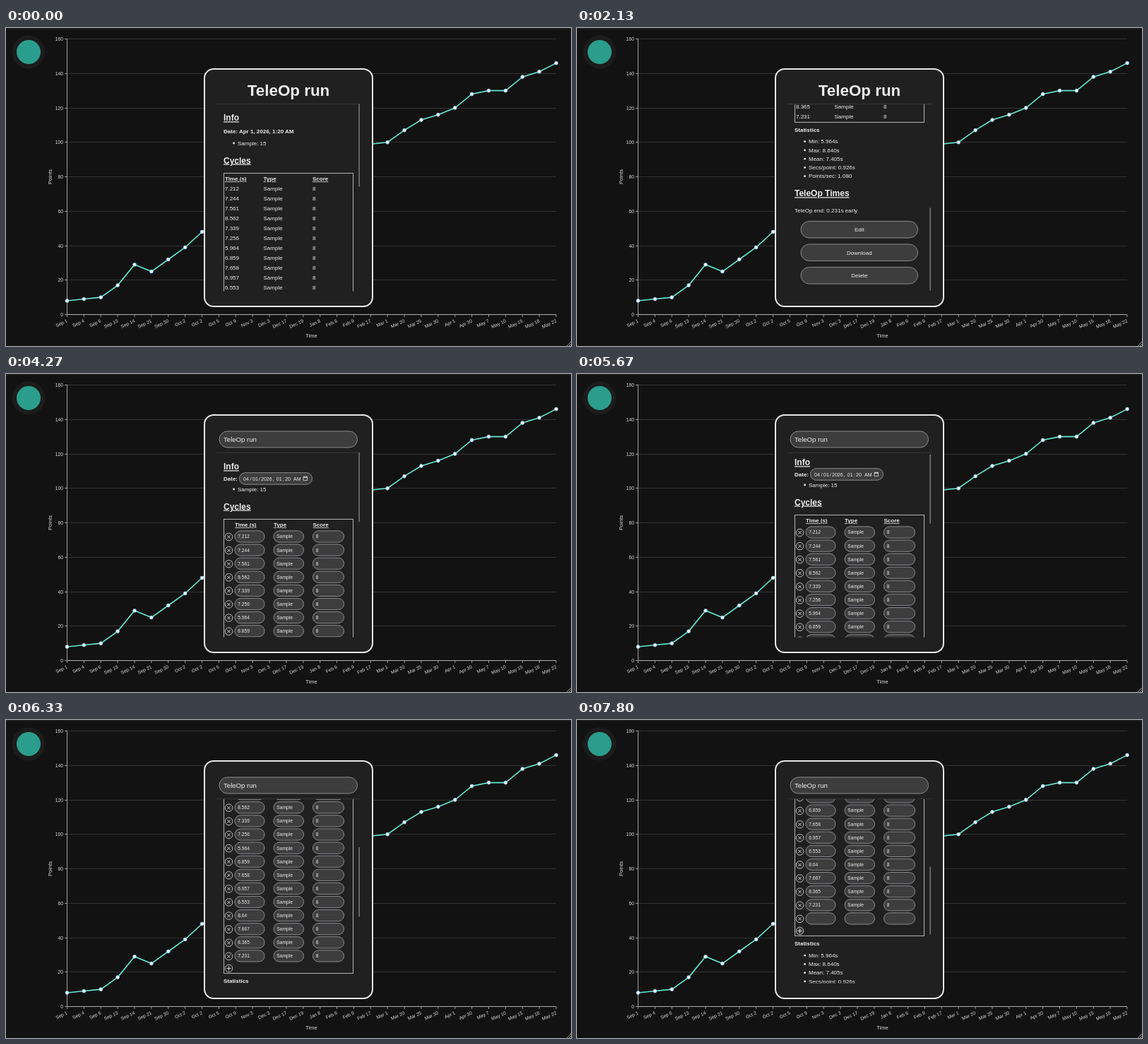
Write an HTML page that moves like this. It is 800 by 450 pixels and loops after 8000 ms.

```html
<!DOCTYPE html>
<html lang="en">
<head>
<meta charset="utf-8">
<title>Run details</title>
<style>
html, body { margin: 0; width: 100%; height: 100%; overflow: hidden; background: #121212; }
svg { display: block; width: 800px; height: 450px; font-family: "Liberation Sans", Arial, sans-serif; }
text { fill: #ececec; white-space: pre; }
.bold { font-weight: bold; }
.head { font-weight: bold; text-decoration: underline; }
.mid { text-anchor: middle; }
.end { text-anchor: end; }
.axis { fill: #dcdcdc; }
.field { fill: #3d3d3d; stroke: #8c8c92; }
.frame { fill: none; stroke: #b4b4b4; }
.round { fill: #242424; stroke: #d0d0d0; stroke-width: .9; }
.cross { fill: none; stroke: #ececec; stroke-width: .9; }
</style>
</head>
<body>
<svg id="stage" viewBox="0 0 800 450"></svg>
<script>
const stage = document.getElementById('stage');

const text = (x, y, str, size = 8, cls = '', more = '') =>
  `<text x="${x}" y="${y}" font-size="${size}" class="${cls}" ${more}>${str}</text>`;
const line = (x1, y1, x2, y2, color, width = 1) =>
  `<path d="M${x1} ${y1}L${x2} ${y2}" stroke="${color}" stroke-width="${width}"/>`;
const pill = (x, y, w, h, id = '') =>
  `<rect class="field" ${id && `id="${id}"`} x="${x}" y="${y}" width="${w}" height="${h}" rx="${h / 2}"/>`;
const frame = (top, bottom) =>
  `<rect class="frame" x="308.5" y="${top}" width="183" height="${bottom - top}"/>`;
const bullet = (y, str) =>
  `<circle cx="322.6" cy="${y + .2}" r="1.4" fill="#ececec"/>` + text(328, y + 2.9, str);
const iconButton = (y, icon, id = '') =>
  `<circle class="round" ${id && `id="${id}"`} cx="315.5" cy="${y}" r="5.3"/>` +
  `<path class="cross" transform="translate(315.5 ${y})" d="${icon}"/>`;

const CLOSE = 'M-2-2L2 2M2-2L-2 2', PLUS = 'M-3 0H3M0-3V3';
const times = '7.212 7.244 7.561 8.562 7.339 7.256 5.964 6.859 7.658 6.957 6.553 8.64 7.667 8.365 7.231'.split(' ');
const ROW = 19.1;

function chart() {
  const days = ('Sep 1,Sep 4,Sep 6,Sep 13,Sep 14,Sep 21,Sep 30,Oct 2,Oct 2,Oct 5,Oct 9,Nov 3,Dec 3,Dec 17,Dec 19,' +
    'Jan 8,Feb 6,Feb 9,Feb 17,Mar 1,Mar 20,Mar 25,Mar 30,Apr 1,Apr 30,May 7,May 10,May 15,May 18,May 22').split(',');
  const points = [8, 9, 10, 17, 29, 25, 32, 39, 48, 55, 60, 65, 70, 75, 80, 85, 90, 95, 99,
    100, 107, 113, 116, 120, 128, 130, 130, 138, 141, 146];
  const px = i => +(86.5 + i * 23.88).toFixed(2);
  const py = v => 405.5 - v * 2.4375;
  let out = '';
  for (let v = 0; v <= 160; v += 20) {
    const y = Math.floor(py(v)) + .5;
    out += line(86, y, 779, y, v ? '#343434' : '#b0b0b0') + line(83, y, 86, y, '#999') +
      text(81, y + 2.3, v, 6.7, 'axis end');
  }
  out += line(86.5, 15, 86.5, 409, '#a0a0a0');
  days.forEach((d, i) => {
    out += line(px(i), 406, px(i), 409, '#999') +
      text(px(i) + 1, 416, d, 6.7, 'axis end', `transform="rotate(-25 ${px(i) + 1} 416)"`);
  });
  out += text(432.5, 438.3, 'Time', 7.6, 'axis mid') +
    text(64.7, 210.5, 'Points', 7.6, 'axis mid', 'transform="rotate(-90 64.7 210.5)"');
  out += `<polyline fill="none" stroke="#62ead2" stroke-width="1.6" points="${points.map((v, i) => px(i) + ',' + py(v)).join(' ')}"/>`;
  points.forEach((v, i) => {
    out += `<circle cx="${px(i)}" cy="${py(v)}" r="2.4" fill="#fff" stroke="#8cc8ee" stroke-width=".9"/>`;
  });
  return out;
}

function stats(y) {
  return text(308, y + 2.9, 'Statistics', 8, 'bold') +
    ['Min: 5.964s', 'Max: 8.640s', 'Mean: 7.405s', 'Secs/point: 0.926s', 'Points/sec: 1.080']
      .map((s, i) => bullet(y + 16.5 + i * 12.25, s)).join('');
}

function tableHead(xs) {
  return text(308, 191.5, 'Cycles', 12, 'head') +
    ['Time (s)', 'Type', 'Score'].map((s, i) => text(xs[i], 216.3, s, 8, 'head')).join('');
}

function viewContent() {
  const xs = [310, 364.5, 434];
  let out = text(308, 131.3, 'Info', 12, 'head') +
    text(308, 149, 'Date: Apr 1, 2026, 1:20 AM', 8, 'bold') +
    bullet(162.8, 'Sample: 15') + tableHead(xs) + frame(205.5, 431.5);
  times.forEach((v, i) => {
    [(+v).toFixed(3), 'Sample', '8'].forEach((s, k) => out += text(xs[k], 230.4 + i * 14, s));
  });
  out += stats(442) + text(308, 536.3, 'TeleOp Times', 12, 'head') +
    text(308, 558.9, 'TeleOp end: 0.231s early');
  ['Edit', 'Download', 'Delete'].forEach((s, i) => {
    const y = 571.5 + i * 32.5;
    out += pill(317, y, 165.5, 23.5, s) + text(399.8, y + 14.7, s, 8, 'mid');
  });
  return out;
}

function editRow(i, cells) {
  const y = 230 + i * ROW, xs = [324, 379, 434.5], ws = [42, 42.5, 44];
  return iconButton(y + .5, CLOSE) + cells.map((s, k) =>
    pill(xs[k], y - 8.1, ws[k], 16.2) + text(xs[k] + 4.3, y + 2.4, s, 6.67)).join('');
}

function editContent() {
  const date = [[336, '04'], [345.6, '/'], [349, '01'], [357.8, '/'], [361, '2026'], [377.5, ','],
    [382.8, '01'], [391.8, ':'], [395, '20'], [407, 'AM']];
  return text(308, 135.3, 'Info', 12, 'head') + text(308, 150.8, 'Date:', 8, 'bold') +
    pill(330.5, 139.7, 103, 16.5) + date.map(([x, s]) => text(x, 150.6, s, 7)).join('') +
    '<path d="M421 145.5h5.5v5h-5.5zM421 146.5h5.5M422.2 144.4v1M425.3 144.4v1" fill="none" stroke="#ddd" stroke-width=".8"/>' +
    bullet(162.8, 'Sample: 15') + tableHead([324, 379, 434.5]) +
    times.map((v, i) => editRow(i, [v, 'Sample', '8'])).join('') +
    `<g id="newRow">${editRow(times.length, ['', '', ''])}</g>` +
    '<rect id="editFrame" class="frame" x="308.5" y="205.5" width="183"/>' +
    `<g id="editTail">${iconButton(515, PLUS, 'add')}${stats(533)}</g>`;
}

const panel = (id, top, title, content) => `
  <g id="${id}">
    ${title}
    <clipPath id="${id}Clip"><rect x="290" y="${top}" width="220" height="${372.5 - top}"/></clipPath>
    <g clip-path="url(#${id}Clip)"><g id="${id}Scroll">${content}</g></g>
    ${line(298, top, 502, top, '#363636')}
  </g>`;

stage.innerHTML = `
  <rect width="800" height="450" fill="#121212"/>
  <rect width="800" height="1.5" fill="#1e1e1e"/>
  <circle cx="32" cy="34" r="23.5" fill="#1c1c1c"/>
  <circle cx="32" cy="34" r="17" fill="#2b9d8c"/>
  ${chart()}
  ${line(794, 450, 800, 444, '#999')}${line(797, 450, 800, 447, '#999')}
  <rect x="281" y="58" width="238" height="336" rx="13" fill="#202020" stroke="#e6e8e6" stroke-width="2"/>
  ${panel('view', 107.5, text(400, 96, 'TeleOp run', 22.4, 'bold mid'), viewContent())}
  ${panel('edit', 111.5, pill(302, 81, 195.5, 23) + text(308, 96, 'TeleOp run', 9.6), editContent())}
  <rect id="thumb" x="499.3" width="1.7" rx=".8" fill="#707070"/>`;

const $ = id => document.getElementById(id);
const set = (id, attrs) => { for (const k in attrs) $(id).setAttribute(k, attrs[k]); };
const shift = (id, y) => set(id, { transform: `translate(0 ${y})` });
const show = (id, on) => set(id, { display: on ? 'inline' : 'none' });

// Cubic Hermite through [tick, offset, speed] keys
function curve(keys, n) {
  if (n <= keys[0][0]) return keys[0][1];
  for (let i = 1; i < keys.length; i++) {
    const [a, p, v] = keys[i - 1], [b, q, w] = keys[i];
    if (n < b) {
      const h = b - a, u = (n - a) / h, e = u * u * (3 - 2 * u);
      return p + (q - p) * e + h * u * (1 - u) * (v * (1 - u) - w * u);
    }
  }
  return keys[keys.length - 1][1];
}

const viewKeys = [[25, 0, 15], [32, 298, 20]];
const editKeys = [[84, 0, 0], [85, 6, 11], [91, 108, 15.5], [95, 163.5, 11.5], [101, 216.5, 0]];

function draw(now) {
  // The screen updates 15 times a second
  const n = Math.floor((now % 8000 + 5) * .015);
  const editing = n >= 61, added = n >= 112, extra = added ? ROW : 0;
  show('view', !editing);
  show('edit', editing);
  show('newRow', added);
  const s = editing ? curve(editKeys, n) + extra : curve(viewKeys, n);
  shift(editing ? 'editScroll' : 'viewScroll', -s);
  shift('editTail', extra);
  set('editFrame', { height: 316.5 + extra });
  set('Edit', { style: `fill:${n < 48 ? '#3d3d3d' : n < 49 ? '#434343' : '#4a4a4a'}` });
  set('add', { style: `fill:${n < 109 ? '#242424' : '#3a3a3a'}` });
  set('thumb', editing
    ? { y: 111 + s * (added ? .41 : .422), height: added ? 96 : 98.5 }
    : { y: 107.3 + s * .493, height: 117.5 });
}

function loop(now) {
  draw(now);
  requestAnimationFrame(loop);
}
draw(0);
requestAnimationFrame(loop);
</script>
</body>
</html>
```
